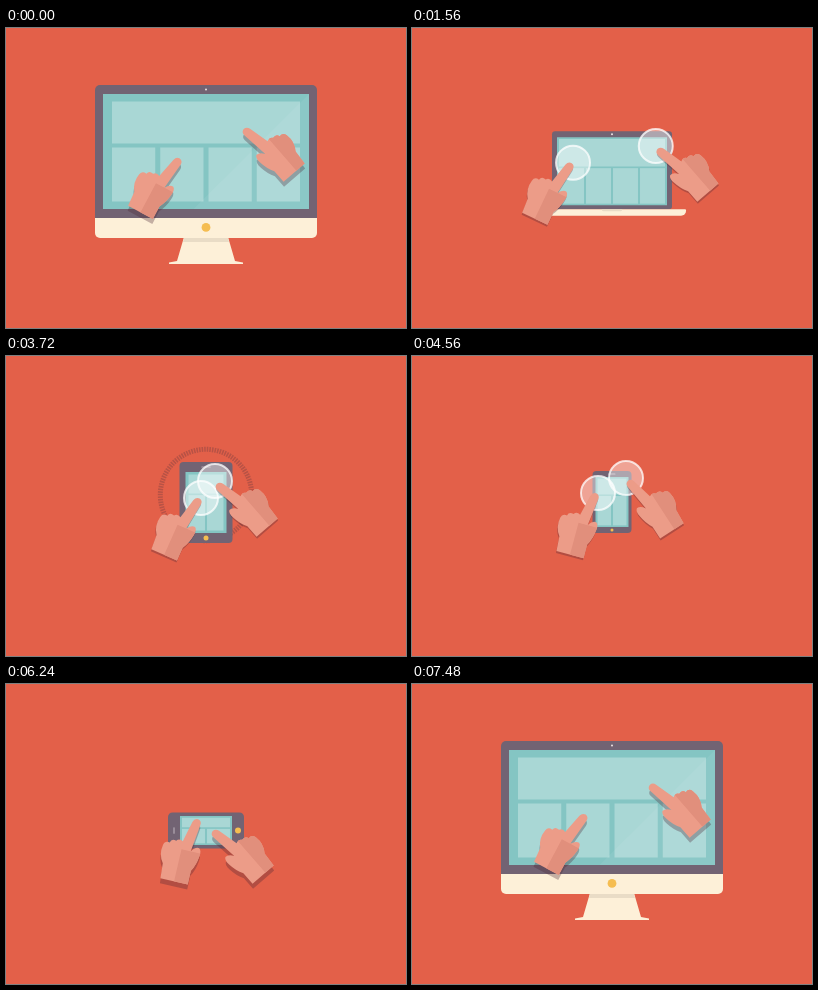
Recreate the animation shown at these times as an HTML page with a canvas. Size 400 by 300 pixels, loop 7.52 s.

```html
<!DOCTYPE html>
<html lang="en">
<head>
<meta charset="utf-8">
<title>Responsive devices</title>
<style>
  html, body { margin: 0; width: 100%; height: 100%; overflow: hidden; background: #e36049; }
  canvas { display: block; width: 400px; height: 300px; }
</style>
</head>
<body>
<canvas id="stage"></canvas>
<script>
const LOOP = 7520;
const COLOR = {
  back: '#e36049', bezel: '#726373', screen: '#84c5c3', tile: 'rgba(255,255,255,.3)',
  cream: '#fdf0d8', creamShade: '#e9dcc6', dot: '#f5bd51',
  skin: '#ec9c88', skinShade: '#e18f7c', shadow: 'rgba(75,40,50,.32)', line: '#8f5f62'
};

const canvas = document.getElementById('stage');
const ctx = canvas.getContext('2d');
const ratio = window.devicePixelRatio || 1;
canvas.width = 400 * ratio;
canvas.height = 300 * ratio;

const rad = deg => deg * Math.PI / 180;
const clamp = v => Math.min(1, Math.max(0, v));
const smooth = v => v * v * (3 - 2 * v);
const span = (t, from, to) => smooth(clamp((t - from) / (to - from)));
const mix = (a, b, k) => a + (b - a) * k;

// Eased values of a track whose rows start with their time
function sample(track, t) {
  let i = 1;
  while (i < track.length - 1 && t >= track[i][0]) i++;
  const a = track[i - 1], b = track[i];
  const k = span(t, a[0], b[0]);
  return a.slice(1).map((v, n) => mix(v, b[n + 1], k));
}

// Every device lies on its side
const none = { chin: 0, stand: 0, base: 0, home: 0, pad: 2, gap: 2 };
const handheld = { ...none, home: 1 };
const desktop = { ...none, cy: 123.5, w: 222, h: 133, r: 5, side: 8, top: 9, bottom: 9, chin: 20, stand: 1, pad: 9, gap: 5 };
const laptop = { ...none, cy: 142.3, w: 120, h: 78, r: 3, side: 5, top: 6, bottom: 4, base: 1 };
const tablet = { ...handheld, cy: 146.5, w: 110, h: 84, r: 5, side: 12, top: 9, bottom: 9, pad: 3 };
const mini = { ...handheld, cy: 146.5, w: 81, h: 53, r: 4, side: 10, top: 6, bottom: 6, pad: 3 };
const small = { ...handheld, cy: 146, w: 62, h: 39, r: 4, side: 6, top: 3, bottom: 3 };
const phone = { ...handheld, cy: 146.5, w: 76, h: 36, r: 4.5, side: 12, top: 3.5, bottom: 3.5 };

const changes = [
  { from: 340, to: 780, next: laptop },
  { from: 1700, to: 2080, next: tablet },
  { from: 3060, to: 3400, next: mini },
  { from: 4160, to: 4570, next: small },
  { from: 4700, to: 5060, next: phone },
  { from: 6260, to: 6640, next: desktop }
];

function deviceAt(t) {
  const now = { ...desktop };
  for (const { from, to, next } of changes) {
    const k = span(t, from, to);
    for (const key in now) now[key] = mix(now[key], next[key], k);
  }
  return now;
}

const turnTrack = [[0, 0], [2180, 0], [2780, 95], [3000, 90], [5400, 90], [5840, -4], [6000, 0], [LOOP, 0]];
const turnAt = t => sample(turnTrack, t)[0];

// Weight of the four-column screen
const wideAt = t => 1 - span(t, 2700, 3060) + span(t, 6260, 6640);

// Time and fingertip
const leftTrack = [
  [0, 172, 133], [320, 101, 186], [1020, 172, 138], [1520, 159, 137], [1720, 150, 143],
  [2080, 172, 140], [2240, 168, 150], [2680, 173, 137], [3040, 174, 135], [3320, 184, 145],
  [3480, 182, 166], [3720, 192, 145], [4140, 166, 143], [4560, 183, 140], [4760, 188, 145],
  [5080, 168, 151], [5760, 184, 166], [6240, 191, 138], [6600, 125, 186], [6880, 162, 136],
  [LOOP, 172, 133]
];
const leftAngle = t => sample([
  [0, 28], [2080, 25], [2680, 17], [3720, 24], [4560, 15], [6240, 13], [6880, 28], [LOOP, 28]
], t)[0];

const rightTrack = [
  [0, 240, 103], [320, 268, 57], [1020, 234, 127], [1520, 247, 124], [1720, 254, 115],
  [2080, 230, 120], [2240, 232, 114], [2680, 234, 123], [3040, 233, 126], [3320, 218, 134],
  [3480, 222, 146], [3720, 213, 130], [4140, 231, 102], [4560, 218, 127], [4760, 212, 132],
  [5080, 238, 103], [5760, 228, 146], [6240, 209, 149], [6600, 264, 69], [6880, 246, 97],
  [LOOP, 240, 103]
];
const rightAngle = t => 41 - 8 * (span(t, 3900, 4500) - span(t, 4700, 5900));

const touchAt = t =>
  span(t, 0, 320) - span(t, 1020, 1220) +
  span(t, 1220, 1480) - span(t, 3200, 3480) +
  span(t, 3480, 3680) - span(t, 5700, 5900) +
  span(t, 6250, 6500) - span(t, 6600, 6880);

function scoped(draw) {
  ctx.save();
  draw();
  ctx.restore();
}

function box(x, y, w, h, r, fill) {
  ctx.fillStyle = fill;
  ctx.beginPath();
  ctx.roundRect(x, y, w, h, r);
  ctx.fill();
}

function disc(x, y, r, fill) {
  ctx.fillStyle = fill;
  ctx.beginPath();
  ctx.arc(x, y, r, 0, 2 * Math.PI);
  ctx.fill();
}

const fillPath = (d, fill) => {
  ctx.fillStyle = fill;
  ctx.fill(new Path2D(d));
};

// One wide tile above a row of columns, centred on the screen
function layout(w, h, cols, head, pad, gap, alpha) {
  if (alpha <= 0) return;
  scoped(() => {
    ctx.globalAlpha *= alpha;
    const x = pad - w / 2, y = pad * 0.82 - h / 2;
    const inner = w - 2 * pad, tall = h - pad * 1.64 - gap * 0.8;
    const top = tall * head, cell = (inner - gap * (cols - 1)) / cols;
    box(x, y, inner, top, 0, COLOR.tile);
    for (let i = 0; i < cols; i++) {
      box(x + i * (cell + gap), y + top + gap * 0.8, cell, tall - top, 0, COLOR.tile);
    }
  });
}

function drawStand(scale, amount) {
  scoped(() => {
    ctx.scale(scale, scale * amount);
    ctx.globalAlpha = clamp(amount * 2);
    fillPath('M-22-1H22L29 23L37 24.5V26H-37V24.5L-29 23Z', COLOR.cream);
    fillPath('M-22 0H22L23 4H-23Z', COLOR.creamShade);
  });
}

function drawBase(w, amount) {
  scoped(() => {
    ctx.globalAlpha = amount;
    const half = w * 0.617;
    box(-half, 0, half * 2, 6.5, [1, 1, 5, 5], COLOR.cream);
    box(-half * 0.14, 0, half * 0.28, 2, [0, 0, 2, 2], COLOR.creamShade);
  });
}

function drawDevice(t) {
  const { cy, w, h, r, side, top, bottom, chin, stand, base, home, pad, gap } = deviceAt(t);
  const turn = turnAt(t), wide = wideAt(t);
  const speed = Math.abs(turnAt(t + 20) - turnAt(t - 20));
  const upright = clamp(turn / 90);

  scoped(() => {
    ctx.translate(200, cy);
    ctx.rotate(rad(turn));
    if (speed > 0.5) ctx.filter = `blur(${Math.min(1.7, speed * 0.3) * ratio}px)`;

    scoped(() => {
      ctx.translate(0, h / 2 + chin);
      if (stand > 0) drawStand(w / 222, stand);
    });
    const foot = chin > 0.5 ? 0 : r;
    box(-w / 2, -h / 2, w, h, [r, r, foot, foot], COLOR.bezel);
    if (chin > 0.5) {
      box(-w / 2, h / 2, w, chin, [0, 0, r, r], COLOR.cream);
      disc(0, h / 2 + chin * 0.47, chin * 0.22, COLOR.dot);
    }
    scoped(() => {
      ctx.translate(0, h / 2);
      if (base > 0) drawBase(w, base);
    });

    scoped(() => {
      ctx.globalAlpha = 1 - home;
      disc(0, top / 2 - h / 2, 1, '#eee4e4');
      ctx.globalAlpha = home;
      disc(w / 2 - side / 2, 0, side * 0.25, COLOR.dot);
      box(side / 2 - w / 2 - 0.6, -h * 0.09, 1.2, h * 0.18, 0.6, '#b5aab4');
    });

    const sw = w - 2 * side, sh = h - top - bottom;
    ctx.translate(0, (top - bottom) / 2);
    box(-sw / 2, -sh / 2, sw, sh, 0, COLOR.screen);
    layout(sw, sh, 4, 0.4375, pad, gap, (1 - upright) * wide);
    layout(sw, sh, 2, 0.4, pad, gap, (1 - upright) * (1 - wide));
    scoped(() => {
      ctx.rotate(-Math.PI / 2);
      layout(sh, sw, 2, 0.35, pad, gap, upright);
    });
    if (stand > 0) {
      ctx.globalAlpha = stand;
      fillPath(`M${sw / 2} ${-sh / 2}V${sh / 2}H${-sw * 0.06}Z`, 'rgba(255,255,255,.06)');
    }
  });
}

function arc(radius, from, to) {
  if (Math.abs(to - from) < 0.5) return;
  ctx.beginPath();
  ctx.arc(200, 146, radius, rad(from), rad(to), to < from);
  ctx.stroke();
}

function drawTurnLines(t) {
  const sweep = (start, end, lag, radius, from, travel) => {
    if (t < start || t > end) return;
    const head = from + travel * span(t, start, end - 40);
    const tail = from + travel * span(t, start + lag, end);
    arc(radius, tail, head);
    arc(radius, tail - 193, head - 193);
  };
  ctx.strokeStyle = COLOR.line;
  ctx.lineWidth = 1.5;
  ctx.lineCap = 'round';
  sweep(2200, 3040, 250, 106.5, 124, 166);
  sweep(5420, 6060, 190, 52, 236, -130);
}

function drawRipple(t) {
  if (t < 3560 || t > 3860) return;
  const k = (t - 3560) / 300;
  scoped(() => {
    ctx.globalAlpha = 0.3 * Math.min(1, 3 * (1 - k));
    ctx.strokeStyle = '#54343e';
    ctx.lineWidth = 5;
    ctx.lineCap = 'butt';
    ctx.setLineDash([1.6, 1]);
    ctx.beginPath();
    ctx.arc(200, 139, 28 + 33 * k, 0, 2 * Math.PI);
    ctx.stroke();
  });
}

function drawTouch(x, y, amount) {
  if (amount <= 0) return;
  scoped(() => {
    ctx.globalAlpha = amount;
    disc(x, y, 17 * (0.6 + 0.4 * amount), 'rgba(255,255,255,.42)');
    ctx.strokeStyle = 'rgba(255,255,255,.75)';
    ctx.lineWidth = 2;
    ctx.stroke();
  });
}

// Left hand pointing up, fingertip at the origin
const hand = new Path2D(
  'M-4.5 1Q-3.5-3 .5-3Q4.5-2 4 2L.5 30Q4 24.5 8 25Q11 27 10 33Q9 42 5 49L5 63H-23' +
  'L-24 48Q-30 40-28 30Q-27 25-22 26Q-21 21.5-16 23Q-13.5 19.5-9.5 22Z'
);

function drawHand([x, y], angle, side, lift) {
  const place = (px, py) => {
    ctx.translate(px, py);
    ctx.scale(side, 1);
    ctx.rotate(rad(angle));
  };
  scoped(() => {
    place(x - side * 0.5, y + 2 + 3 * lift);
    ctx.fillStyle = COLOR.shadow;
    ctx.fill(hand);
  });
  scoped(() => {
    place(x, y);
    ctx.fillStyle = COLOR.skin;
    ctx.fill(hand);
    ctx.clip(hand);
    ctx.fillStyle = COLOR.skinShade;
    if (side > 0) ctx.fillRect(-9, 30, 30, 40);
    else ctx.fillRect(-40, 15, 28, 55);
  });
}

function render(now) {
  const t = now % LOOP;
  ctx.setTransform(ratio, 0, 0, ratio, 0, 0);
  ctx.fillStyle = COLOR.back;
  ctx.fillRect(0, 0, 400, 300);

  drawTurnLines(t);
  drawRipple(t);
  drawDevice(t);

  const left = sample(leftTrack, t), right = sample(rightTrack, t);
  const touch = clamp(touchAt(t));
  drawTouch(left[0] + 3, left[1] - 3, touch);
  drawTouch(right[0] - 4, right[1] - 5, touch);
  drawHand(left, leftAngle(t), 1, 1 - touch);
  drawHand(right, rightAngle(t), -1, 1 - touch);
  requestAnimationFrame(render);
}

requestAnimationFrame(render);
</script>
</body>
</html>
```
